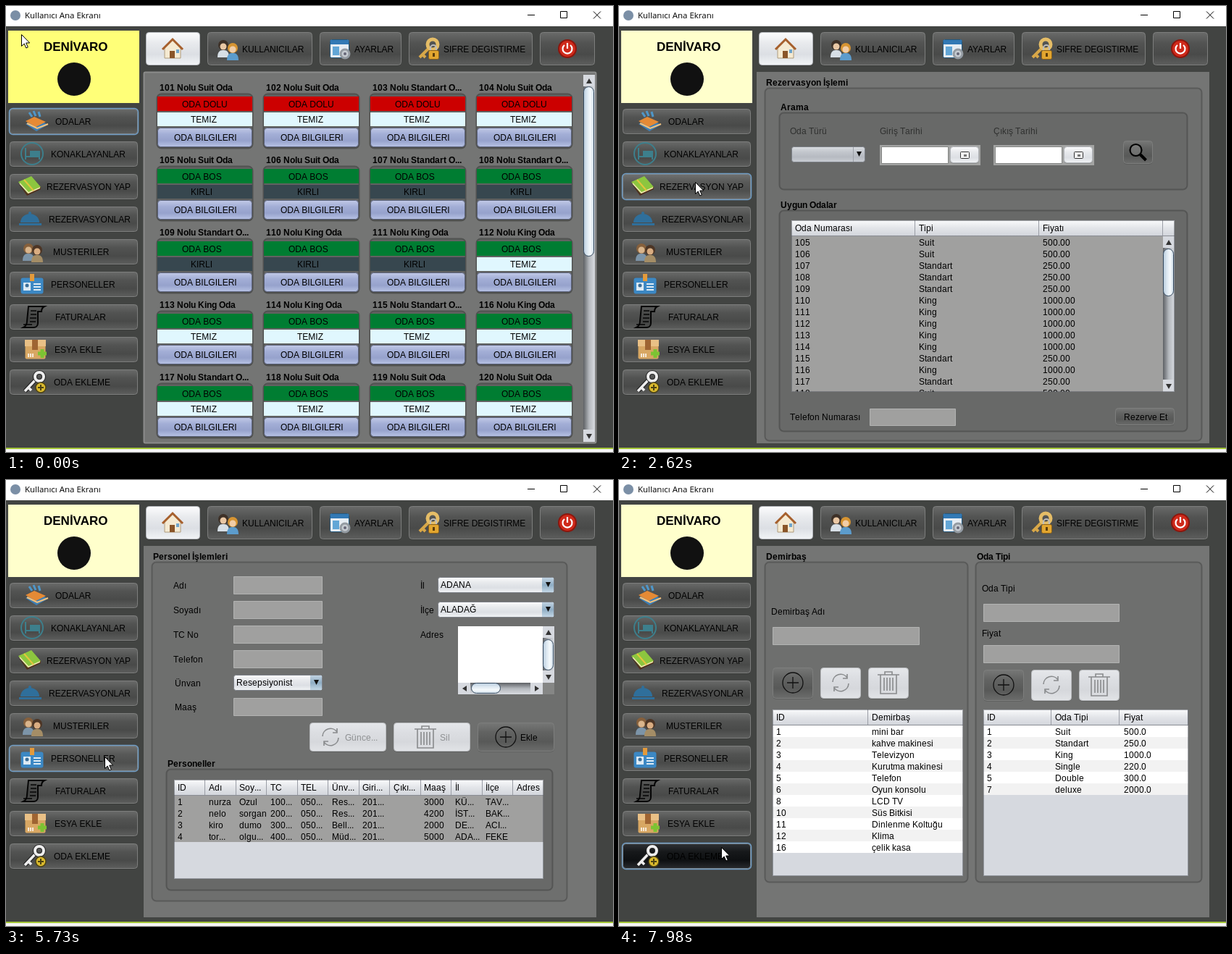
An HTML page with a canvas for the animation above (8 s loop, 838 px wide and 616 px high).

```html
<!DOCTYPE html>
<html lang="tr">
<head>
<meta charset="utf-8">
<title>Kullanıcı Ana Ekranı</title>
<style>
html, body { margin: 0; width: 100%; height: 100%; overflow: hidden; background: #424442; }
canvas { display: block; }
</style>
</head>
<body>
<canvas id="stage" width="838" height="616"></canvas>
<script>
const ctx = document.getElementById('stage').getContext('2d');
const LOOP = 8000;
const PLAIN = '12px "Liberation Sans", Arial, sans-serif';
const BOLD = 'bold ' + PLAIN;
const GRAY = '#a0a09f', PALE = '#d6d9df', DIM = '#303130';

// ---------- basic drawing ----------
const widths = new Map();
function advance(ch, font) {
  const key = font + ch;
  if (!widths.has(key)) widths.set(key, Math.round(ctx.measureText(ch).width));
  return widths.get(key);
}
// Whole-pixel advances, as a hinted desktop font has.
function text(s, x, y, color = '#000', font = PLAIN) {
  ctx.font = font;
  ctx.fillStyle = color;
  for (const ch of s) {
    ctx.fillText(ch, x, y);
    x += advance(ch, font);
  }
}
// Kerned text for the captions in capitals.
function caption(s, x, y, font = PLAIN) {
  ctx.font = font;
  ctx.fillStyle = '#000';
  ctx.fillText(s, x, y);
}
function rect(x, y, w, h, color) {
  ctx.fillStyle = color;
  ctx.fillRect(x, y, w, h);
}
function fade(colors, x0, y0, x1, y1) {
  const g = ctx.createLinearGradient(x0, y0, x1, y1);
  colors.forEach((c, i) => g.addColorStop(i / (colors.length - 1), c));
  return g;
}
const down = (y, h, ...colors) => fade(colors, 0, y, 0, y + h);
const across = (x, w, ...colors) => fade(colors, x, 0, x + w, 0);
function box(x, y, w, h, r, fill, stroke, line = 1) {
  ctx.beginPath();
  ctx.roundRect(x + .5, y + .5, w - 1, h - 1, r);
  if (fill) { ctx.fillStyle = fill; ctx.fill(); }
  if (stroke) { ctx.strokeStyle = stroke; ctx.lineWidth = line; ctx.stroke(); }
}
function shape(x, y, d, fill, stroke, line = 1.5) {
  const p = new Path2D(d);
  ctx.save();
  ctx.translate(x, y);
  if (fill) { ctx.fillStyle = fill; ctx.fill(p); }
  if (stroke) { ctx.strokeStyle = stroke; ctx.lineWidth = line; ctx.stroke(p); }
  ctx.restore();
}
function disc(x, y, r, fill, stroke, line = 1.5) {
  ctx.beginPath();
  ctx.arc(x, y, r, 0, 7);
  if (fill) { ctx.fillStyle = fill; ctx.fill(); }
  if (stroke) { ctx.strokeStyle = stroke; ctx.lineWidth = line; ctx.stroke(); }
}

// ---------- widgets ----------
const SKINS = {
  dark: ['#6a6b6a', '#525352', '#494a49', '#5e5f5e'],
  hover: ['#717271', '#585958', '#4e4f4e', '#656665'],
  pressed: ['#303336', '#16181a', '#0e1012', '#2a2d30'],
  page: ['#777877', '#626362', '#585958', '#6c6d6c'],
  light: ['#fdfdfe', '#e8eaed', '#dcdfe4', '#f3f5f7'],
  off: ['#e6e8eb', '#dcdee2', '#d6d8dc', '#e2e4e7'],
  room: ['#c3cbe8', '#a3aed6', '#96a2cc', '#b9c4e6'],
  empty: ['#dcdfe3', '#c3c7cd', '#b6bac1', '#ccd0d6']
};
const EDGES = { light: '#b3b6bb', off: '#b9bbbe', room: '#5d647c' };
function button(x, y, w, h, skin = 'page', focused) {
  box(x, y + 1, w, h, 4, 'rgba(0,0,0,.25)');
  box(x, y, w, h, 4, down(y, h, ...SKINS[skin]), EDGES[skin] || '#7d7e7d');
  if (focused) box(x - 1, y - 1, w + 2, h + 2, 5, null, '#6f9cc4', 1.5);
}
function panel(title, x, y, w, h) {
  text(title, x + 2, y - 3, '#000', BOLD);
  box(x, y, w, h, 6, 'rgba(0,0,0,.05)', 'rgba(0,0,0,.21)', 2);
}
function field(x, y, w, h, hint) {
  box(x, y, w, h, 0, GRAY, '#b2b3b2');
  if (hint) text(hint, x + 4, y + 16, DIM);
}
function dateField(x, y, w, h) {
  rect(x, y, w, h, '#a3a4a3');
  box(x + 2, y + 2, w - 46, h - 4, 0, '#fff', '#858785');
  button(x + w - 42, y + 2, 40, h - 5, 'light');
  const cx = x + w - 28, cy = y + h / 2 - 5;
  box(cx, cy, 13, 10, 1, '#f4f4f4', '#333');
  rect(cx + 5, cy + 4, 4, 3, '#777');
}
function combo(x, y, w, label) {
  const skin = label ? SKINS.light : SKINS.empty;
  box(x, y, w, 22, 3, down(y, 22, ...skin), '#7c8087');
  if (label) rect(x + w - 17, y + 1, 16, 20, down(y, 22, '#c5d6e4', '#8fadc4', '#c8dbe9'));
  else rect(x + w - 17, y + 1, 1, 20, '#9da1a8');
  shape(x + w - 12, y + 7, 'M0 0H7L3.5 7Z', '#111');
  text(label, x + 4, y + 15);
}
const THUMB = ['#b4c8da', '#dae6f0', '#f6fafc', '#c9d9e6'];
const TRACK = ['#5d6064', '#b4b8bd', '#d8dbe0'];
function vScroll(x, y, h, thumbY, thumbH) {
  rect(x, y, 16, h, across(x, 16, ...TRACK));
  rect(x, y, 16, 16, PALE);
  rect(x, y + h - 17, 16, 17, PALE);
  box(x, thumbY, 15, thumbH, 7, across(x, 15, ...THUMB), '#33475c');
  shape(x + 4, y + 5, 'M0 7H8L4 0Z', '#333');
  shape(x + 4, y + h - 11, 'M0 0H8L4 7Z', '#333');
}
function hScroll(x, y, w, thumbX, thumbW) {
  rect(x, y, w, 16, down(y, 16, ...TRACK));
  rect(x, y, 17, 16, PALE);
  rect(x + w - 17, y, 17, 16, PALE);
  box(thumbX, y, thumbW, 15, 7, down(y, 15, ...THUMB), '#33475c');
  shape(x + 6, y + 4, 'M6 0V8L0 4Z', '#333');
  shape(x + w - 11, y + 4, 'M0 0V8L6 4Z', '#333');
  rect(x + w, y, 16, 16, '#858685');
}
// Equal columns; cells of a row are separated by "|".
function table(x, y, w, h, heads, rows, { scroll, striped } = {}) {
  const cols = heads.split('|'), step = w / cols.length, full = w + (scroll ? 16 : 0);
  ctx.save();
  ctx.beginPath();
  ctx.rect(x, y, full, h);
  ctx.clip();
  rect(x, y, full, h, scroll ? GRAY : PALE);
  rows.forEach((row, i) => {
    const top = y + 22 + 16 * i;
    rect(x, top, w, 16, striped ? (i % 2 ? '#f2f2f2' : '#fff') : GRAY);
    row.split('|').forEach((cell, c) => text(cell, Math.round(x + c * step) + 5, top + 13));
  });
  rect(x, y, full, 21, down(y, 21, '#fafbfc', '#e3e5e9', '#d3d6dc'));
  rect(x, y + 21, full, 1, '#8a8d94');
  cols.forEach((name, c) => {
    const left = Math.round(x + c * step);
    text(name, left + 5, y + 15);
    rect(Math.round(left + step) - 1, y, 1, 21, '#9a9da5');
  });
  if (scroll) vScroll(x + w, y + 22, h - 22, ...scroll);
  ctx.restore();
  ctx.strokeStyle = 'rgba(80,84,92,.5)';
  ctx.lineWidth = 1;
  ctx.strokeRect(x + .5, y + .5, full - 1, h - 1);
}
function searchButton(x, y, w, h) {
  button(x, y, w, h);
  const cx = x + w / 2 - 3, cy = y + h / 2 - 3;
  disc(cx, cy, 8, 'rgba(255,255,255,.12)', '#000', 2.2);
  shape(cx, cy, 'M6 6L14 14', null, '#000', 4);
}
const icons = {
  plus(x, y) {
    disc(x, y, 14, null, '#111', 1.3);
    shape(x, y, 'M-8 0H8M0 -8V8', null, '#111', 1.3);
  },
  refresh(x, y) {
    shape(x, y, 'M-11 -1A11 11 0 0 1 9 -7M9 -12V-6H3M11 1A11 11 0 0 1 -9 7M-9 12V6H-3', null, '#898b8d', 1.6);
  },
  trash(x, y) {
    shape(x, y, 'M-15 -11H15M-5 -11V-15H5V-11M-11 -11V15H11V-11M-6 -7V11M-2 -7V11M2 -7V11M6 -7V11', null, '#898b8d', 1.6);
  }
};
function editButtons(x, y) {
  [['refresh', 'Günce...', 'off', 49], ['trash', 'Sil', 'off', 64], ['plus', 'Ekle', 'page', 59]]
    .forEach(([icon, label, skin, dx], i) => {
      const left = x + 116 * i;
      button(left, y, 106, 40, skin);
      icons[icon](left + [29, 44, 39][i], y + 20);
      text(label, left + dx, y + 25, skin === 'off' ? '#8e9092' : '#000');
    });
}
function iconButtons(x, y) {
  ['plus', 'refresh', 'trash'].forEach((icon, i) => {
    button(x + 66 * i, y, 56, 43, i ? 'off' : 'page');
    icons[icon](x + 66 * i + 28, y + 21);
  });
}

// ---------- pages ----------
const KINDS = 'SSTSSSTTTKKKKKTKTSSS';
const KIND_NAMES = { S: 'Suit', T: 'Standart', K: 'King' };
const PRICES = { S: '500.00', T: '250.00', K: '1000.00' };

function roomsPage() {
  [...KINDS].forEach((kind, i) => {
    const x = 209 + 147 * (i % 4), y = 121 + 100 * Math.floor(i / 4);
    const taken = i < 4, dirty = i > 3 && i < 11;
    const tail = kind === 'T' ? ' O...' : ' Oda';
    text(`${101 + i} Nolu ${KIND_NAMES[kind]}${tail}`, x + 3, y - 4, '#000', BOLD);
    box(x - 1, y, 133, 76, 6, '#616261', '#515251', 2);
    rect(x, y + 4, 131, 20, taken ? '#cc0000' : '#007d32');
    caption(taken ? 'ODA DOLU' : 'ODA BOS', x + 34, y + 19);
    rect(x, y + 26, 131, 19, dirty ? '#37474f' : '#e0f7fe');
    caption(dirty ? 'KIRLI' : 'TEMIZ', x + 46, y + 40);
    button(x, y + 47, 131, 27, 'room');
    caption('ODA BILGILERI', x + 23, y + 65);
  });
  box(190, 91, 625, 513, 2, null, '#8b8c8b', 2);
  vScroll(797, 95, 507, 111, 235);
}

const guests = [
  [1, 'orvan|denul|05001112...|orvan@po...'],
  [4, 'torkaman|belisoy|05003334...|torkamanb...'],
  [6, 'kerdem|tamburkoylu|05005556...|k.eko@po...'],
  [5, 'nelo|sorgan|05007778...|nelosorga...'],
  [1, 'eko|lumar|05009990...|eko_lumar@']
];
function guestRows() {
  const day = d => ({ 1: '2018-01-1...', 2: '2018-01-2...', 9: '2019-02-0...' })[d] || '';
  const come = '11222111122111921', leave = '112221111--111-21';
  return guests.flatMap(([n, who], g) => Array(n).fill(`${g + 1}|${who}`))
    .map((row, i) => `${row}|${day(come[i])}|${day(leave[i])}`);
}
function searchArea() {
  panel('Arama', 201, 113, 604, 118);
  field(228, 130, 436, 25, 'Ara');
  text('Tarih Seçiniz', 226, 179, DIM);
  dateField(226, 187, 210, 30);
  dateField(466, 187, 200, 30);
  searchButton(698, 139, 46, 46);
}
function guestsPage() {
  searchArea();
  panel('Konaklayanlar', 201, 265, 604, 326);
  table(219, 286, 552, 290, 'ID|Adı|Soyadı|Cep No|Mail|Giriş Tarihi|Çıkış Tarihi', guestRows(), { scroll: [325, 168] });
}
function bookingPage() {
  panel('Rezervasyon İşlemi', 201, 113, 604, 488);
  panel('Arama', 221, 147, 564, 107);
  text('Oda Türü', 236, 177, DIM);
  text('Giriş Tarihi', 360, 177, DIM);
  text('Çıkış Tarihi', 517, 177, DIM);
  combo(238, 194, 102, '');
  dateField(360, 192, 139, 28);
  dateField(517, 192, 139, 28);
  searchButton(696, 186, 41, 32);
  panel('Uygun Odalar', 221, 282, 564, 306);
  const rows = [...KINDS].map((k, i) => `${101 + i}|${KIND_NAMES[k]}|${PRICES[k]}`).slice(4, 18);
  table(238, 296, 513, 237, 'Oda Numarası|Tipi|Fiyatı', rows, { scroll: [335, 66] });
  text('Telefon Numarası', 236, 572);
  field(346, 556, 119, 24);
  button(685, 555, 82, 24);
  text('Rezerve Et', 697, 572);
}
function bookingsPage() {
  panel('Rezervasyon Listesi', 201, 113, 604, 476);
  field(218, 138, 440, 23, 'Ara...');
  text('Tarih Seçiniz', 216, 188, DIM);
  dateField(216, 197, 195, 28);
  dateField(465, 197, 195, 28);
  searchButton(739, 155, 48, 32);
  rect(216, 243, 573, 332, PALE);
  panel('Rezervasyonlar', 221, 259, 564, 311);
  rect(224, 262, 558, 305, PALE);
  table(232, 280, 540, 273, 'Oda Numarası|Telefon Numarası|Başlangıç Tarihi|Bitiş Tarihi', [
    '4|05001112233|2018-01-30 11:30:00.0|2018-01-31 11:30:00...',
    '5|05003334455|2018-01-30 11:32:00.0|2018-01-31 11:33:00...',
    '18|05005556677|2018-01-30 11:33:00.0|2018-01-31 11:34:00...',
    '18|05007778899|2018-01-23 03:58:00.0|2018-01-26 03:59:00...'
  ]);
}
function customersPage() {
  panel('Müşteri İşlemleri', 201, 113, 571, 463);
  ['Ad', 'Soyad', 'TC No', 'Telefon', 'e-Mail'].forEach((label, i) => {
    text(label, 216, 145 + 34 * i, DIM);
    field(272, 128 + 34 * i, 130, 25);
  });
  ['İl', 'İlçe', 'Adres'].forEach((label, i) => text(label, 506, 147 + 33 * i, DIM));
  combo(552, 132, 184, 'ADANA');
  combo(552, 164, 184, 'ALADAĞ');
  rect(552, 196, 172, 78, GRAY);
  vScroll(724, 196, 78, 214, 36);
  hScroll(552, 274, 172, 570, 100);
  editButtons(416, 306);
  panel('Müşteriler', 221, 370, 531, 165);
  table(238, 385, 480, 131, 'ID|Adı|Soyadı|TC|TEL|Mail|İl|İlçe|Adres', [
    '1|orvan|denul|1000...|0500...|orvan...|ADANA|ALAD...|ova ...',
    '2|torka...|belisoy|2000...|0500...|torka...|ADANA|ALAD...|tepe...',
    '3|ker...|tambu...|3000...|0500...|k.eko...|HATAY|İSKE...|tepe...',
    '4|nelo|sorgan|4000...|0500...|nelo...|ADANA|ALAD...|yayla ...',
    '6|pelvin|tüzen|5000...|0500...|tuzen.p...|ADANA|ALAD...|kuyu...',
    '9|turga...|dolkan|6000...|0500...|turga...|DÜZCE|AKÇA...|derel...',
    '10|nurza|yelmir|7000|0500|nurzay|ADANA|ALAD|koru'
  ], { scroll: [424, 62] });
  button(614, 550, 140, 20, 'off');
  text('Oda Kaydi', 656, 564, '#8e9092');
}
function staffPage() {
  panel('Personel İşlemleri', 201, 113, 574, 469);
  ['Adı', 'Soyadı', 'TC No', 'Telefon'].forEach((label, i) => {
    text(label, 231, 150 + 34 * i);
    field(314, 133 + 34 * i, 123, 25);
  });
  text('Ünvan', 233, 285);
  combo(314, 269, 123, 'Resepsiyonist');
  text('Maaş', 233, 318);
  field(314, 301, 123, 25);
  ['İl', 'İlçe', 'Adres'].forEach((label, i) => text(label, 572, 150 + 34 * i));
  combo(596, 134, 161, 'ADANA');
  combo(596, 168, 161, 'ALADAĞ');
  rect(624, 202, 117, 78, '#fff');
  vScroll(741, 202, 78, 220, 43);
  hScroll(624, 280, 117, 642, 41);
  editButtons(419, 335);
  panel('Personeller', 221, 399, 534, 168);
  table(232, 414, 510, 137, 'ID|Adı|Soy...|TC|TEL|Ünv...|Giri...|Çıkı...|Maaş|İl|İlçe|Adres', [
    '1|nurza|Ozul|100...|050...|Res...|201...||3000|KÜ...|TAV...',
    '2|nelo|sorgan|200...|050...|Res...|201...||4200|İST...|BAK...',
    '3|kiro|dumo|300...|050...|Bell...|201...||2000|DE...|ACI...',
    '4|tor...|olgu...|400...|050...|Müd...|201...||5000|ADA...|FEKE'
  ]);
}
function invoicesPage() {
  searchArea();
  panel('Faturalar', 201, 265, 604, 326);
  table(219, 286, 552, 290, 'ID|Adı|Soyadı|Tarih|Tutar', [], { scroll: [325, 168] });
}
function itemsPage() {
  panel('Demirbaş', 201, 113, 281, 443);
  text('Demirbaş Adı', 210, 186);
  field(212, 203, 203, 25);
  iconButtons(212, 259);
  const items = ['mini bar', 'kahve makinesi', 'Televizyon', 'Kurutma makinesi', 'Telefon', 'Oyun konsolu',
    'LCD TV', 'Süs Bitkisi', 'Dinlenme Koltuğu', 'Klima', 'çelik kasa'];
  const ids = [1, 2, 3, 4, 5, 6, 8, 10, 11, 12, 16];
  table(212, 317, 263, 230, 'ID|Demirbaş', items.map((name, i) => `${ids[i]}|${name}`), { striped: true });
  panel('Oda Tipi', 492, 113, 313, 443);
  text('Oda Tipi', 501, 154);
  field(503, 171, 188, 25);
  text('Fiyat', 501, 216);
  field(503, 228, 188, 25);
  iconButtons(503, 262);
  table(503, 317, 283, 230, 'ID|Oda Tipi|Fiyat',
    ['1|Suit|500.0', '2|Standart|250.0', '3|King|1000.0', '4|Single|220.0', '5|Double|300.0', '7|deluxe|2000.0'],
    { striped: true });
}
const pages = [roomsPage, guestsPage, bookingPage, bookingsPage, customersPage, staffPage, invoicesPage, itemsPage];

// ---------- window frame and menus ----------
function person(x, y, hair, skin, coat) {
  shape(x, y, 'M-8 14C-8 5 -4 4 0 4S8 5 8 14Z', coat);
  disc(x, y - 3, 7, hair);
  disc(x, y - 1, 4.5, skin);
}
const menu = [
  ['ODALAR', 68, y => {
    shape(27, y, 'M0 4L16 -3L31 5L15 14Z', '#3f7fb5');
    shape(27, y, 'M0 0L12 -6L28 1L14 8Z', '#e58a35');
    shape(27, y, 'M2 3L16 10L31 4', null, '#f4c27c', 2);
    shape(27, y, 'M5 -12L9 -6M11 -14L14 -7M18 -13L20 -6', null, '#4f97c9', 3);
  }],
  ['KONAKLAYANLAR', 62, y => {
    disc(36, y, 15, null, '#3d7f8c', 2);
    shape(36, y, 'M-9 -8V8M-9 4H10V8M10 4V-3H-2V4', null, '#3d7f8c', 2);
    rect(34, y - 3, 12, 7, '#3d7f8c');
  }],
  ['REZERVASYON YAP', 56, y => {
    shape(17, y, 'M0 -4L12 13L31 4V0L12 9Z', '#51301d');
    shape(17, y, 'M0 -6L18 -14L31 1L13 10Z', '#8cc63f');
    shape(17, y, 'M2 -4L14 9L30 2', null, '#f2e8b0', 1.5);
    shape(17, y, 'M8 -9L21 6', null, '#e5c43c', 2);
  }],
  ['REZERVASYONLAR', 59, y => {
    shape(33, y, 'M-13 5A13 12 0 0 1 13 5Z', '#2f6f9b');
    rect(18, y + 6, 31, 3, '#2f6f9b');
    disc(33, y - 8, 2, '#2f6f9b');
  }],
  ['MUSTERILER', 65, y => {
    person(31, y - 1, '#86603c', '#d9b58c', '#7c94a8');
    person(43, y + 1, '#4c3525', '#d9ad82', '#a48d66');
  }],
  ['PERSONELLER', 62, y => {
    box(20, y - 9, 32, 23, 3, '#3c88c4');
    rect(33, y - 14, 6, 10, '#e39a3b');
    rect(24, y - 2, 10, 11, '#dceaf4');
    disc(29, y + 2, 2.5, '#3c6f98');
    [0, 4, 8].forEach(d => rect(38, y - 1 + d, 10, 2, '#dceaf4'));
  }],
  ['FATURALAR', 68, y => {
    shape(38, y, 'M-7 -14H15C11 -12 11 -9 11 -7H6V9C6 13 3 15 0 15H-14C-10 13 -9 10 -9 6Z', 'rgba(0,0,0,.1)', '#050505', 2);
    shape(38, y, 'M-4 -8H4M-4 -3H4M-5 2H4M-5 7H3M-14 11H-2', null, '#050505', 1.5);
  }],
  ['ESYA EKLE', 67, y => {
    box(26, y - 13, 29, 27, 2, '#d8a763');
    rect(26, y - 13, 29, 9, '#e9c086');
    rect(36, y - 13, 8, 14, '#9f6432');
    shape(31, y, 'M0 6V11M3 6V11M6 6V11', null, '#fff', 1.5);
    shape(50, y + 6, 'M-6 0H6M0 -6V6', null, '#7cc333', 5);
  }],
  ['ODA EKLEME', 66, y => {
    shape(46, y - 7, 'M-5 4L-20 20', null, '#222', 6);
    shape(46, y - 7, 'M-5 4L-20 20M-15 15L-11 19', null, '#eee', 3.5);
    disc(46, y - 7, 6, null, '#222', 6);
    disc(46, y - 7, 6, null, '#eee', 4);
    disc(48, y + 8, 7, '#d9b92e', '#4d4314');
    shape(48, y + 8, 'M-4 0H4M0 -4V4', null, '#4d4314', 2);
  }]
];
function titleBar() {
  rect(0, 0, 838, 28, '#fff');
  disc(13, 13, 7, '#7b8fa6');
  caption('Kullanıcı Ana Ekranı', 26, 17, '11.5px "Open Sans", "Noto Sans", sans-serif');
  shape(720, 12.5, 'M0 0H10M91 -5L101 5M101 -5L91 5', null, '#000', 1);
  box(765, 7, 10, 10, 0, null, '#000');
}
function topMenu() {
  button(193, 36, 75, 46, 'light');
  shape(230, 59, 'M-11 -1V13H11V-1L0 -12Z', '#f5ead2', '#ad9a7c', 1);
  shape(230, 59, 'M-14 1L0 -13L14 1', null, '#a65f2c', 3);
  rect(226, 62, 7, 10, '#8a5529');
  rect(235, 60, 4, 5, '#6fa5cc');
  button(278, 36, 145, 46, 'dark');
  person(300, 57, '#3d3027', '#e9c7a4', '#d7dfe6');
  person(313, 61, '#d69432', '#f0cda7', '#5c9ccc');
  caption('KULLANICILAR', 326, 64);
  button(433, 36, 113, 46, 'dark');
  box(447, 46, 27, 26, 2, '#e6edf3', '#24587e');
  rect(448, 47, 25, 6, '#3279b5');
  rect(451, 56, 9, 12, '#62a6d6');
  disc(468, 66, 6, '#c5cbd1', '#949ba2', 3);
  disc(468, 66, 2, '#667');
  caption('AYARLAR', 481, 64);
  button(556, 36, 171, 46, 'dark');
  shape(589, 53, 'M-4 4L-18 18M-14 14L-10 18', null, '#d8a748', 4);
  disc(589, 53, 7, null, '#e5bd67', 5);
  box(583, 61, 15, 13, 2, '#e3a62f', '#8b611a');
  shape(590, 61, 'M-4 0V-3A4 4 0 0 1 4 -3V0', null, '#bdbdbd', 2);
  rect(589, 65, 3, 5, '#5c3d0c');
  caption('SIFRE DEGISTIRME', 604, 64);
  button(737, 36, 76, 46, 'dark');
  disc(775, 59, 12, '#cf2a1b', '#8c160d', 2);
  shape(775, 59, 'M-4 -5A6.5 6.5 0 1 0 4 -5M0 -8V0', null, '#fff', 2.2);
}
function emblem(hot) {
  rect(3, 34, 181, 100, hot ? '#ffff78' : '#ffffcc');
  caption('DENİVARO', 52, 62, 'bold 17px "Liberation Sans", Arial, sans-serif');
  disc(94, 101, 23, '#111');
}

// ---------- timeline ----------
const presses = [0, 1470, 2480, 3470, 4480, 5590, 6370, 7150, 7980];
const releases = [0, 1610, 2620, 3720, 4650, 5730, 6600, 7300];
// first step, last step, number of steps, end point
const moves = [
  [140, 830, 10, 86, 192], [1690, 1920, 4, 105, 243], [2700, 3000, 5, 125, 302],
  [3240, 3320, 2, 123, 305], [3780, 4180, 6, 128, 337], [4880, 5120, 4, 136, 382],
  [5810, 6060, 4, 140, 441], [6600, 6690, 2, 142, 478], [7370, 7520, 3, 141, 506],
  [7690, 7690, 1, 141, 507]
];
const latest = (times, t) => times.filter(at => at <= t).length - 1;

// The pointer jumps from sample to sample and slows down towards its goal.
function pointerAt(t) {
  let x = 21, y = 39;
  for (const [from, to, steps, endX, endY] of moves) {
    if (t < from) break;
    const gap = (to - from) / Math.max(1, steps - 1) || 1;
    const f = Math.min(steps, Math.floor((t - from) / gap + 1e-6) + 1) / steps;
    const eased = 1 - (1 - f) ** 1.5;
    x += (endX - x) * eased;
    y += (endY - y) * eased;
  }
  return [Math.round(x), Math.round(y)];
}

function draw(t) {
  const [px, py] = pointerAt(t);
  const focus = latest(presses, t), page = latest(releases, t);
  rect(0, 28, 838, 582, '#424442');
  rect(0, 610, 838, 2, '#a4c639');
  rect(0, 612, 838, 4, '#f7f7f7');
  titleBar();
  emblem(py < 134);
  topMenu();
  menu.forEach(([label, x, icon], i) => {
    const y = 142 + 45 * i;
    const over = py >= y && py < y + 36;
    const skin = i === focus && focus > page ? 'pressed' : over ? 'hover' : 'dark';
    button(5, y, 177, 35, skin, i === focus);
    icon(y + 17);
    caption(label, x, y + 22);
  });
  rect(190, 91, 625, 513, '#747574');
  pages[page]();
  shape(px, py, 'M.5 .5V16.5L4.2 13L6.8 19L9.3 18L6.7 12H11.7Z', '#fff', '#000', 1);
}

const start = performance.now();
function tick() {
  draw((performance.now() - start) % LOOP);
  requestAnimationFrame(tick);
}
tick();
</script>
</body>
</html>
```
